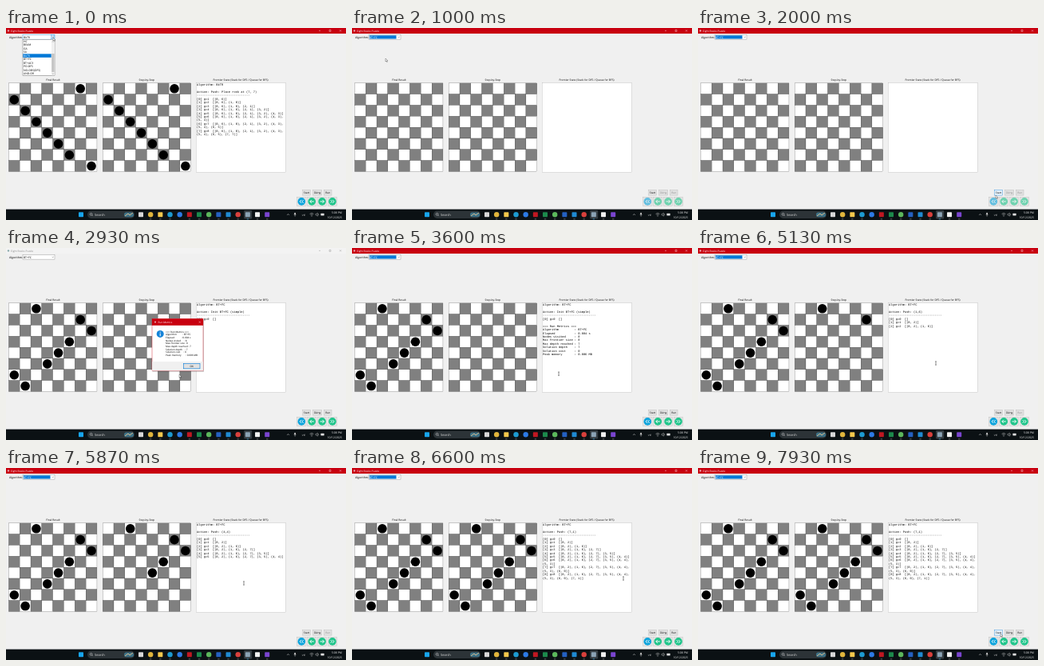
Write an HTML page that moves like this. It is 426 by 240 pixels and loops after 8000 ms.

```html
<!DOCTYPE html>
<html lang="en">
<head>
<meta charset="utf-8">
<title>Eight Rooks Puzzle</title>
<style>
  html, body { margin: 0; width: 100%; height: 100%; overflow: hidden; background: #f0f0f0; }
  svg { display: block; width: 100%; height: 100%; }
  text { font-family: "Open Sans", "Noto Sans", sans-serif; white-space: pre; text-rendering: geometricPrecision; }
  .mono { font-family: "Liberation Mono", monospace; }
</style>
</head>
<body>
<svg id="stage" viewBox="0 0 426 240">
  <g id="app"></g>
  <g id="taskbar"></g>
  <g id="pointer"></g>
</svg>
<script>
const LOOP = 8000;
const CELL = 13.82, BOARD_Y = 68.9;
const RED = '#c8000f', BLUE = '#0078d7';
const ALGORITHMS = ['HC', 'BEAM', 'GA', 'SA', 'BkTR', 'BT+FC', 'BT+AC3', 'PO-DFS', 'NO-OBS(DFS)', 'AND-OR'];
const OLD_COLUMNS = [6, 0, 1, 2, 3, 4, 5, 7];
const NEW_COLUMNS = [2, 6, 7, 5, 4, 3, 0, 1];

// Moments of the session, in ms
const PICK = 950, START = 2250, CONFIRM = 3300, RUN = 4350, FIRST_STEP = 4550, STEP = 235;

// Pointer stops: time, x, y
const PATH = [
  [0, 59, 12], [250, 57, 14], [650, 42, 38], [1050, 42, 38], [1850, 373, 209], [2300, 373, 209],
  [2930, 217, 158], [3180, 232, 148], [3450, 232, 148], [4050, 403, 206], [4450, 403, 206],
  [5080, 298, 144], [5900, 298, 144], [6500, 340, 138], [6950, 340, 138], [7700, 379, 207], [LOOP, 379, 207]
];

const METRICS = [
  ['Algorithm', 'BT+FC'], ['Elapsed', '0.004 s'], ['Nodes visited', 8], ['Max frontier size', 8],
  ['Max depth reached', 7], ['Solution depth', 7], ['Solution cost', 0], ['Peak memory', '0.006 MB']
];
const metricLines = ['=== Run Metrics ===', ...METRICS.map(([name, value]) => name.padEnd(18) + ': ' + value)];

const rect = (x, y, w, h, fill, more = '') =>
  `<rect x="${x}" y="${y}" width="${w}" height="${h}" fill="${fill}" ${more}/>`;
const disc = (x, y, r, fill, more = '') => `<circle cx="${x}" cy="${y}" r="${r}" fill="${fill}" ${more}/>`;
const line = (d, stroke, width = .4) => `<path d="${d}" fill="none" stroke="${stroke}" stroke-width="${width}"/>`;
const label = (s, x, y, size = 3.4, fill = '#000', more = '') =>
  `<text x="${x}" y="${y}" font-size="${size}" fill="${fill}" ${more}>${s}</text>`;
const centered = 'text-anchor="middle"';
const border = (color, width = .35) => `stroke="${color}" stroke-width="${width}"`;

function board(x, columns) {
  let out = '';
  for (let r = 0; r < 8; r++)
    for (let c = 0; c < 8; c++)
      out += rect(x + c * CELL, BOARD_Y + r * CELL, CELL, CELL, (r + c) % 2 ? '#808080' : '#fff', border('#222', .22));
  columns.forEach((c, r) => out += disc(x + (c + .5) * CELL, BOARD_Y + (r + .5) * CELL, 5.8, '#000'));
  return out;
}

const cross = (x, y, color) =>
  line(`M${x - 1} ${y - 1}l2 2m0 -2l-2 2`, color);

function titleBar(active) {
  const ink = active ? '#fff' : '#888';
  return rect(0, 0, 426, 7, active ? RED : '#f3f3f3') + disc(3, 3.4, 1.2, active ? '#e8a0a8' : '#8aa') +
    label('Eight Rooks Puzzle', 6, 4.7, 3.25, ink) +
    line('M392 3.4h2', ink) + line('M405 2.4h2v2h-2z', ink) + cross(419, 3.4, ink);
}

function comboBox(value, open, focused) {
  const marked = focused && !open;
  let out = label('Algorithm:', 4, 12.7, 3.5) + rect(21, 8.6, 40, 5.5, '#fff', border(open ? BLUE : '#7a7a7a')) +
    (marked ? rect(21.8, 9.3, 33.7, 4.2, BLUE) : '') +
    label(value, 22, 12.7, 3.4, marked ? '#fff' : '#000') +
    (open ? rect(56.5, 8.8, 4.3, 5.1, '#cce4f7', border(BLUE, .3)) : '') +
    line('M57.6 10.8l1.1 1.1l1.1 -1.1', '#444');
  if (!open) return out;
  out += rect(21, 14.2, 40, 45.3, '#fff', border('#333'));
  ALGORITHMS.forEach((name, i) => {
    const y = 14.5 + i * 4.47, chosen = name === value;
    if (chosen) out += rect(21.3, y, 35.4, 4.47, BLUE);
    out += label(name, 22, y + 3.4, 3.4, chosen ? '#fff' : '#000');
  });
  return out + rect(57, 14.5, 3.8, 44.7, '#f0f0f0') + rect(57.2, 32, 3.4, 23, '#c4c4c4') +
    line('M58 17.5l.9 -.9l.9 .9M58 56.6l.9 .9l.9 -.9', '#444');
}

function button(s, x, w, enabled, p) {
  const hover = enabled && p.x > x && p.x < x + w && p.y > 202 && p.y < 210;
  return rect(x, 202.4, w, 6.7, hover ? '#e5f1fb' : '#e1e1e1', border(hover ? BLUE : '#adadad')) +
    label(s, x + w / 2, 207, 3.3, enabled ? '#000' : '#8c8c8c', centered);
}

function stepButtons(enabled) {
  const arrows = ['M-.2 -2l-2 2l2 2M2.4 -2l-2 2l2 2', 'M2.6 0h-5m2 -2l-2 2l2 2',
    'M-2.6 0h5m-2 -2l2 2l-2 2', 'M-2.4 -2l2 2l-2 2M.2 -2l2 2l-2 2'];
  return arrows.map((d, i) => {
    const x = 370.3 + i * 12.9;
    return rect(x - 5.7, 211.2, 11.4, 11.4, '#e6e6e6', border('#b4b4b4')) +
      `<g transform="translate(${x} 216.9)" opacity="${enabled ? 1 : .6}">` +
      disc(0, 0, 4.8, i ? '#20c58b' : '#0ca4dc') + line(d, '#fff', .9) + '</g>';
  }).join('');
}

// Lists the growing partial placements, wrapping after five rooks
function frontier(columns, first, last) {
  const lines = [];
  for (let n = first; n <= last; n++) {
    const pairs = columns.slice(0, n).map((c, r) => `(${r}, ${c})`);
    const head = `[${n - first}] g=${n}  [`;
    if (n > 5) lines.push(head + pairs.slice(0, 5).join(', ') + ',', pairs.slice(5).join(', ') + ']');
    else lines.push(head + pairs.join(', ') + ']');
  }
  return lines;
}

function logLines(t, step) {
  const log = (name, action, rows) => ['Algorithm: ' + name, '', 'Action: ' + action, '-'.repeat(30), ...rows];
  if (t < PICK) return log('BkTR', 'Push: Place rook at (7, 7)', frontier(OLD_COLUMNS, 1, 8));
  if (t < START) return [];
  const action = step ? `Push: (${step - 1},${NEW_COLUMNS[step - 1]})` : 'Init BT+FC (simple)';
  const rows = frontier(NEW_COLUMNS, 0, step);
  if (t >= CONFIRM && t < FIRST_STEP) rows.push('', ...metricLines);
  return log('BT+FC', action, rows);
}

function dialog() {
  return rect(183.5, 89.5, 64.5, 65.5, '#000', 'opacity=".18"') +
    rect(183, 88.3, 64, 65.2, '#fff', border(RED, .4)) + rect(183, 88.3, 64, 8.5, RED) +
    label('Run Metrics', 190.5, 93.8, 3.2, '#fff') + disc(187, 92.6, 1.1, '#e8a0a8') + cross(242.8, 92.6, '#fff') +
    disc(193.2, 107.4, 4.5, '#1683d8') + rect(192.7, 106.6, 1, 3.6, '#fff') + disc(193.2, 105.1, .65, '#fff') +
    metricLines.map((s, i) => label(s, 200, 105.8 + i * 3.63, 3.05)).join('') +
    rect(183.2, 142, 63.6, 11.3, '#f0f0f0') +
    rect(222.5, 144.6, 20.5, 6.2, '#e1e1e1', border(BLUE, .6)) + label('OK', 232.8, 148.9, 3.2, '#000', centered);
}

function drawApp(t, p) {
  const step = Math.max(0, Math.min(8, Math.floor((t - FIRST_STEP) / STEP)));
  const old = t < PICK, solved = t >= START, asking = solved && t < CONFIRM;
  const running = t >= RUN && step < 8;
  const ready = old || solved;
  const shown = NEW_COLUMNS.slice(0, step);
  return rect(0, 0, 426, 227, '#f0f0f0') + titleBar(!asking) +
    comboBox(old ? 'BkTR' : 'BT+FC', old, !asking) +
    label('Final Result', 59, 66.4, 3.3, '#000', centered) +
    label('Step-by-Step', 176.3, 66.4, 3.3, '#000', centered) +
    label('Frontier State (Stack for DFS / Queue for BFS)', 294, 66.4, 3.3, '#000', centered) +
    board(3.4, old ? OLD_COLUMNS : solved ? NEW_COLUMNS : []) +
    board(121.2, old ? OLD_COLUMNS : shown) +
    rect(238.3, 68.7, 112, 111.6, '#fff', border('#aaa', .3)) +
    logLines(t, step).map((s, i) => label(s, 239, 72.1 + i * 4.43, 3.7, '#000', 'class="mono"')).join('') +
    button('Start', 371.8, 9.4, true, p) + button('Dừng', 384.6, 11, ready, p) +
    button('Run', 398.4, 9.6, ready && !running, p) + stepButtons(ready) +
    (asking ? dialog() : '');
}

function drawTaskbar() {
  const icon = (x, color, round) => round ? disc(x, 233.2, 3.2, color) :
    rect(x - 3, 230.2, 6, 6, color, 'rx=".7"');
  const apps = [
    ['#d8d8d8'], ['#e0b53c', 1], ['#f4c84c'], ['#1d9bd1', 1], ['#2d7be5', 1], ['#c01822'], ['#1c8a4c'],
    ['#5cb85c', 1], ['#2461c2'], ['#1f8ad2'], ['#d8403c', 1], ['#8ba3b5'], ['#f2f2f2'], ['#7a45d0']
  ];
  let out = rect(0, 226.6, 426, 13.4, '#0b1114') + icon(94, '#18a5ee') +
    rect(102, 228.6, 59, 9.4, '#2c3337', 'rx="4.7"') +
    disc(106.6, 232.8, 1.4, 'none', border('#eee', .5)) + line('M107.6 233.8l1.2 1.2', '#eee', .5) +
    label('Search', 111, 234.8, 4.1, '#ddd') +
    rect(148, 230.4, 12, 5.8, '#3c7186', 'rx="2.5"') + line('M149 235l4 -3l2 2l4 -3', '#d9b98c', 1);
  out += rect(298.2, 228, 10, 10.6, '#353d42', 'rx="1"');
  apps.forEach(([color, round], i) => {
    const x = 169 + i * 12.17;
    out += icon(x, color, round);
    if (i > 0 && i !== 4) out += rect(x - 1.2, 238.6, 2.4, .6, i === 11 ? '#4cc2ff' : '#999');
  });
  return out + line('M352 234l1.5 -1.5l1.5 1.5', '#ddd', .5) +
    rect(361.3, 230.8, 1.6, 3, '#ddd', 'rx=".8"') + line('M360.5 233.2q1.6 2.6 3.2 0M362.1 234.6v1.2', '#ddd') +
    label('VIE', 373, 234.5, 3, '#ddd', centered) +
    line('M380.6 232.4q2.4 -2 4.8 0M381.6 233.7q1.4 -1.2 2.8 0', '#ddd', .5) + disc(383, 235, .5, '#ddd') +
    line('M388 232.4h1l1.4 -1.2v4l-1.4 -1.2h-1zM391.4 232q.9 1.2 0 2.4', '#ddd') +
    rect(394.4, 231.8, 4.2, 2.7, '#ddd', 'rx=".5"') +
    label('5:08 PM', 421, 232.4, 3.5, '#eee', 'text-anchor="end"') +
    label('10/12/2025', 421, 237.8, 3.5, '#eee', 'text-anchor="end"');
}

function pointerAt(t) {
  const i = PATH.findIndex(stop => stop[0] > t);
  const [t0, x0, y0] = PATH[i - 1], [t1, x1, y1] = PATH[i];
  const u = (t - t0) / (t1 - t0), e = u * u * (3 - 2 * u);
  return { x: x0 + (x1 - x0) * e, y: y0 + (y1 - y0) * e };
}

function drawPointer({ x, y }) {
  const overText = x > 238 && x < 350 && y > 69 && y < 180;
  const shape = overText ? line('M-.8 -2.2h1.6M0 -2.2v4.4M-.8 2.2h1.6', '#000', .45) :
    `<path d="M0 0v4l1 -.9l.7 1.5l.6 -.3l-.7 -1.4h1.3z" fill="#fff" ${border('#000', .3)}/>`;
  return `<g transform="translate(${x} ${y})">${shape}</g>`;
}

const [app, taskbar, pointer] = ['app', 'taskbar', 'pointer'].map(id => document.getElementById(id));
taskbar.innerHTML = drawTaskbar();
let lastApp = '';

function frame() {
  const t = performance.now() % LOOP, p = pointerAt(t);
  const markup = drawApp(t, p);
  if (markup !== lastApp) app.innerHTML = lastApp = markup;
  pointer.innerHTML = drawPointer(p);
  requestAnimationFrame(frame);
}
frame();
</script>
</body>
</html>
```
